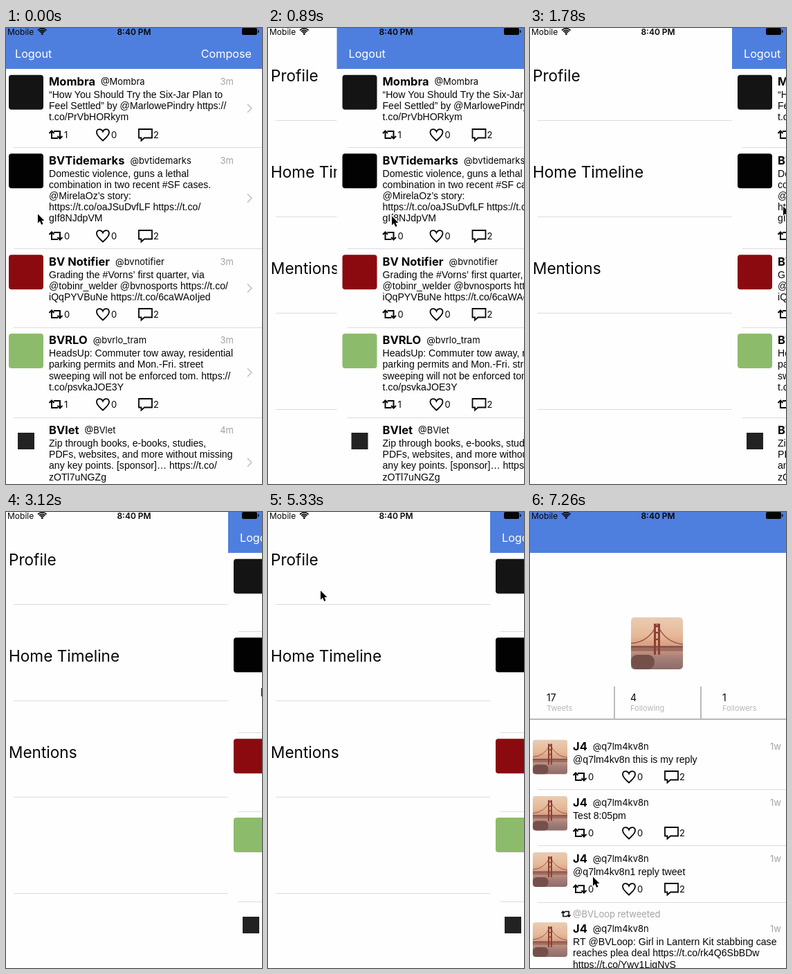
An HTML page with a canvas that plays this animation: 370x658 px, repeating every 8 s.

```html
<!DOCTYPE html>
<html lang="en">
<head>
<meta charset="utf-8">
<title>Timeline with side menu</title>
<style>
html, body { margin: 0; width: 100%; height: 100%; overflow: hidden; background: #fdfdfd; }
canvas { display: block; width: 370px; height: 658px; }
</style>
</head>
<body>
<canvas id="stage"></canvas>
<script>
const W = 370, H = 658, LOOP = 8000, TICK = 148.15;
const canvas = document.getElementById('stage');
const ctx = canvas.getContext('2d');
const ratio = window.devicePixelRatio || 1;
canvas.width = W * ratio;
canvas.height = H * ratio;

const BLUE = '#4f7fde', PAPER = '#fefefe', INK = '#050505', GRAY = '#a3a3a3', RULE = '#dcdcde';
const UI = 'Inter, sans-serif', BODY = '"Liberation Sans", Arial, sans-serif';
const LINE = 16.2;

// Each key is [tick, value...]; values between keys are linear.
const slideKeys = [[3, 0], [4, 10], [5, 50], [6, 103.5], [7, 166], [8, 222], [9, 243],
  [10, 253], [12, 296], [13, 311], [14, 319], [16, 325]];
const pointerKeys = [[2, 45, 267], [3, 62, 268], [4, 82, 269], [6, 178, 270], [8, 288, 264],
  [10, 321, 259], [12, 365, 256], [13, 380, 254], [20, 380, 252], [21, 368, 252], [23, 250, 200],
  [26, 65, 132], [27, 58, 160], [28, 70, 186], [31, 71, 201], [33, 71, 201], [35, 74, 132],
  [36, 75, 112], [40, 75, 112], [41, 70, 125], [44, 28, 300], [46, 50, 440], [47, 87, 508],
  [48, 79, 521], [49, 90, 525]];

const posts = [
  { name: 'Mombra', handle: '@Mombra', age: '3m', shares: 1, mark: '#141414', text: [
    '“How You Should Try the Six-Jar Plan to', 'Feel Settled” by @MarlowePindry https://', 't.co/PrVbHORkym'] },
  { name: 'BVTidemarks', handle: '@bvtidemarks', age: '3m', shares: 0, mark: '#020202', text: [
    'Domestic violence, guns a lethal', 'combination in two recent #SF cases.', '@MirelaOz’s story:',
    'https://t.co/oaJSuDvfLF https://t.co/', 'gIf8NJdpVM'] },
  { name: 'BV Notifier', handle: '@bvnotifier', age: '3m', shares: 0, mark: '#8b0a10', text: [
    'Grading the #Vorns’ first quarter, via', '@tobinr_welder @bvnosports https://t.co/',
    'iQqPYVBuNe https://t.co/6caWAoIjed'] },
  { name: 'BVRLO', handle: '@bvrlo_tram', age: '3m', shares: 1, mark: '#8dbb6c', text: [
    'HeadsUp: Commuter tow away, residential', 'parking permits and Mon.-Fri. street',
    'sweeping will not be enforced tom. https://', 't.co/psvkaJOE3Y'] },
  { name: 'BVlet', handle: '@BVlet', age: '4m', shares: 0, mark: '#222', small: true, text: [
    'Zip through books, e-books, studies,', 'PDFs, websites, and more without missing',
    'any key points. [sponsor]… https://t.co/', 'zOTl7uNGZg'] }
];
const ownPost = (text, via) =>
  ({ name: 'J4', handle: '@q7lm4kv8n', age: '1w', shares: 0, text, via });
const ownPosts = [
  ownPost(['@q7lm4kv8n this is my reply']),
  ownPost(['Test 8:05pm']),
  ownPost(['@q7lm4kv8n1 reply tweet']),
  ownPost(['RT @BVLoop: Girl in Lantern Kit stabbing case',
    'reaches plea deal https://t.co/rk4Q6SbBDw', 'https://t.co/Ywy1LigNyS'], '@BVLoop retweeted')
];

function track(keys, tick) {
  const next = keys.findIndex(key => key[0] > tick);
  if (next === 0) return keys[0].slice(1);
  if (next < 0) return keys[keys.length - 1].slice(1);
  const a = keys[next - 1], b = keys[next], p = (tick - a[0]) / (b[0] - a[0]);
  return a.slice(1).map((v, i) => v + (b[i + 1] - v) * p);
}

function label(text, x, y, font, color = INK, align = 'left') {
  ctx.font = font;
  ctx.fillStyle = color;
  ctx.textAlign = align;
  ctx.fillText(text, x, y);
}

function box(x, y, w, h, color, radius = 0) {
  ctx.fillStyle = color;
  ctx.beginPath();
  ctx.roundRect(x, y, w, h, radius);
  ctx.fill();
}

function stroke(path, x, y, width = 1.8, color = INK, scale = 1) {
  ctx.save();
  ctx.translate(x, y);
  ctx.scale(scale, scale);
  ctx.lineWidth = width;
  ctx.strokeStyle = color;
  ctx.stroke(path);
  ctx.restore();
}

// Icons are drawn about their vertical middle, from their left edge.
const shareIcon = new Path2D('M.5-2 4-5.5 7.5-2M4-5V5H13M7-5H16V5M12.5 2 16 5.5 19.5 2');
const heartIcon = new Path2D('M10 8.5C7 5.5 1 1.5 1-3.5C1-9 8-9.5 10-4.5C12-9.5 19-9 19-3.5C19 1.5 13 5.5 10 8.5Z');
const replyIcon = new Path2D('M1-8H20V4.5H9L4.5 8.5V4.5H1Z');
const chevron = new Path2D('M0-6 6 0 0 6');
const arrow = new Path2D('M0 0V13L3 10.3 5.2 15.3 7.5 14.3 5.4 9.5H9.4Z');

function photo(x, y, size) {
  ctx.save();
  ctx.beginPath();
  ctx.roundRect(x, y, size, size, size > 60 ? 5 : 4);
  ctx.clip();
  ctx.translate(x, y);
  ctx.scale(size, size);
  const sky = ctx.createLinearGradient(0, 0, 0, 1);
  [[0, '#e9cdb4'], [.35, '#e6b897'], [.6, '#cf9880'], [.78, '#a57f78'], [1, '#8d6c69']]
    .forEach(stop => sky.addColorStop(...stop));
  ctx.fillStyle = sky;
  ctx.fillRect(0, 0, 1, 1);
  box(0, .56, 1, .09, '#9a6d62');
  box(0, .72, .45, .28, '#75504b', .12);
  ctx.lineWidth = .02;
  ctx.strokeStyle = '#9c5546';
  ctx.beginPath();
  ctx.moveTo(0, .5);
  ctx.quadraticCurveTo(.35, .48, .5, .13);
  ctx.quadraticCurveTo(.65, .48, 1, .52);
  ctx.stroke();
  box(0, .55, 1, .03, '#8b4a3e');
  box(.44, .12, .04, .6, '#8b3f35');
  box(.52, .12, .04, .6, '#8b3f35');
  [.16, .28, .41].forEach(top => box(.44, top, .12, .03, '#8b3f35'));
  ctx.restore();
}

function rule(y, x, right) {
  box(x, Math.floor(y), right - x, 1, RULE);
}

function actions(post, y, shift) {
  stroke(shareIcon, 62, y, 2);
  stroke(heartIcon, 130 + shift, y);
  stroke(replyIcon, 191 + shift, y);
  const font = '13px ' + UI;
  label(post.shares, 84, y + 5, font);
  label(0, 152 + shift, y + 5, font);
  label(2, 213 + shift, y + 5, font);
}

// Draws one post and returns the top of the next one.
function drawPost(post, top, own) {
  let y = top;
  if (post.via) {
    stroke(shareIcon, 45, y + 17, 2.2, INK, .7);
    label(post.via, 62, y + 21.5, '13px ' + UI, GRAY);
    y += 20;
  }
  if (own) photo(4, y + 9, 50);
  else if (post.small) box(17, y + 22, 24, 24, post.mark);
  else box(4, y + 8.7, 50, 50, post.mark, 4);

  label(post.name, 62, y + 24, 'bold 16.5px ' + UI);
  const handleX = 62 + ctx.measureText(post.name).width + 8;
  label(post.handle, handleX, y + 23, '13px ' + UI);
  label(post.age, own ? 363 : 329, y + 23, '13px ' + UI, GRAY, 'right');
  post.text.forEach((line, i) => label(line, 62, y + 42 + i * LINE, '14.1px ' + BODY));
  actions(post, Math.round(y + 62.3 + (post.text.length - 1) * LINE), own ? 3 : 0);

  const bottom = y + 65 + post.text.length * LINE;
  if (!own) stroke(chevron, 349, (y + bottom) / 2, 1.7, '#c7c7cc');
  rule(bottom, 11, 374);
  return bottom;
}

function drawMenu() {
  box(0, 0, W, H, PAPER);
  ['Profile', 'Home Timeline', 'Mentions'].forEach((item, i) =>
    label(item, 4, 77 + i * 139, '22.6px ' + UI));
  for (let i = 0; i < 4; i++) rule(133 + i * 139, 11, W);
}

function drawFeed(slide) {
  ctx.save();
  ctx.translate(slide, 0);
  box(-4, 0, W + 8, H, PAPER);
  box(-4, 0, W + 8, 59, BLUE);
  label('Logout', 13, 43, '16.2px ' + UI, '#fff');
  label('Compose', 355, 43, '16.2px ' + UI, '#fff', 'right');
  posts.reduce((top, post) => drawPost(post, top, false), 59);
  ctx.restore();
}

function drawProfile() {
  box(0, 0, W, H, PAPER);
  box(0, 0, W, 59, BLUE);
  photo(146, 152, 75);
  [[24, 17, 'Tweets'], [145, 4, 'Following'], [278, 1, 'Followers']].forEach(([x, count, name]) => {
    label(count, x, 273, '14px ' + UI);
    label(name, x, 287, '11px ' + UI, '#b8b8b8');
  });
  [121, 246].forEach(x => box(x, 252, 2, 46, '#b9b9b9'));
  box(0, 298, W, 2, '#b9b9b9');
  ownPosts.reduce((top, post) => drawPost(post, top, true), 319.5);
}

function drawStatus() {
  label('Mobile', 2, 10, '12px ' + UI);
  label('8:40 PM', 185, 10, '600 12px ' + UI, INK, 'center');
  ctx.strokeStyle = INK;
  ctx.lineWidth = 1.7;
  [3.6, 6.2, 8.8].forEach(r => {
    ctx.beginPath();
    ctx.arc(52.3, 9.5, r, -Math.PI * .75, -Math.PI * .25);
    ctx.stroke();
  });
  ctx.fillStyle = INK;
  ctx.beginPath();
  ctx.arc(52.3, 8.7, 1.4, 0, Math.PI * 2);
  ctx.fill();
  box(341, 0, 22, 10, INK, 2);
  box(364, 3, 1.5, 4, INK, 1);
}

function drawPointer(x, y) {
  stroke(arrow, x + 1, y + 1.5, 2.2, '#fff');
  ctx.save();
  ctx.translate(x + 1, y + 1.5);
  ctx.fillStyle = '#000';
  ctx.fill(arrow);
  ctx.restore();
}

function draw(time) {
  const tick = Math.floor((time + 7.1) / TICK);
  ctx.setTransform(ratio, 0, 0, ratio, 0, 0);
  if (tick < 37) {
    drawMenu();
    drawFeed(track(slideKeys, tick)[0]);
  } else {
    drawProfile();
  }
  drawStatus();
  drawPointer(...track(pointerKeys, tick));
}

let start;
function loop(now) {
  start ??= now;
  draw((now - start) % LOOP);
  requestAnimationFrame(loop);
}
draw(0);
requestAnimationFrame(loop);
</script>
</body>
</html>
```
